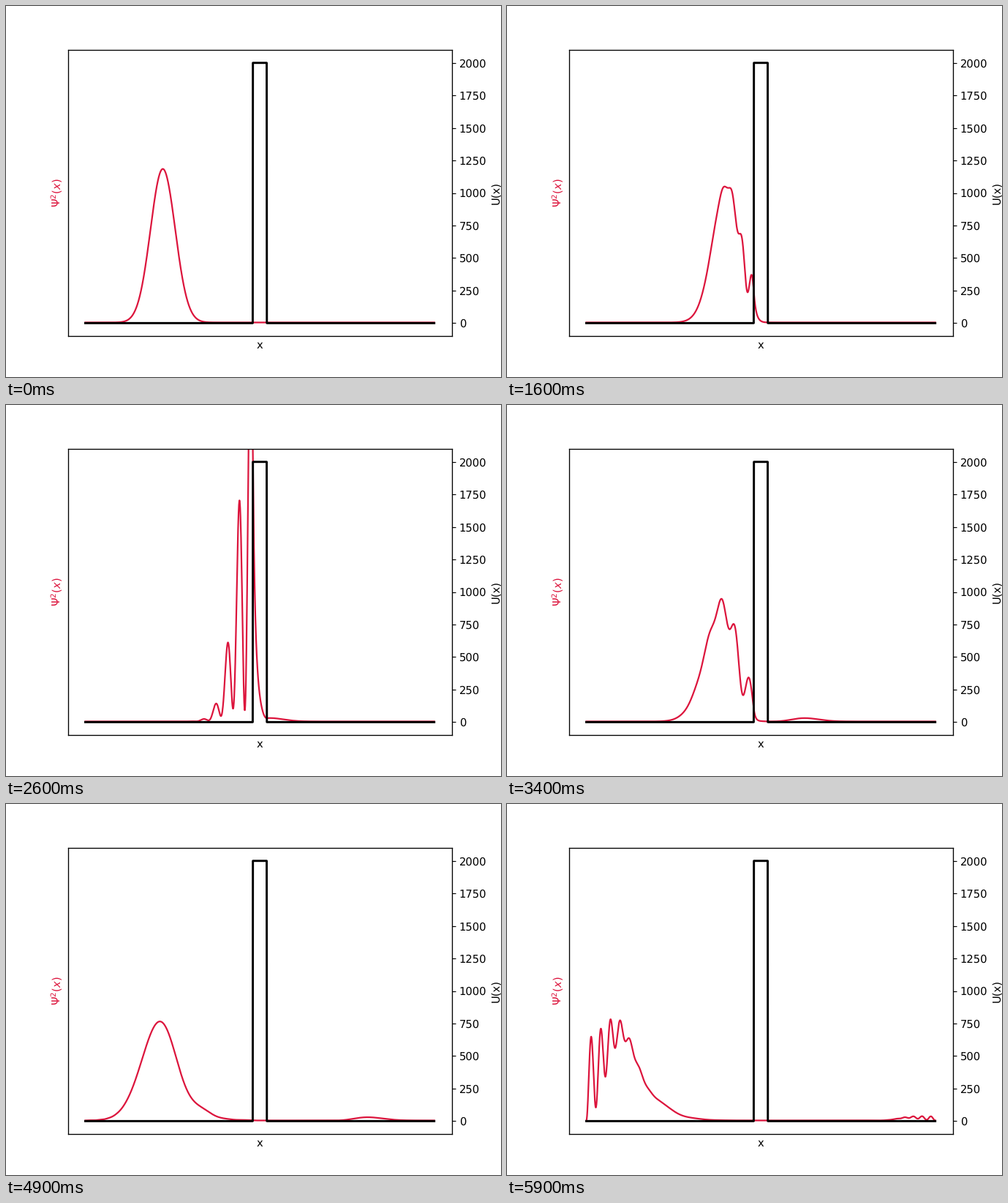
Recreate the animation shown at these times as a matplotlib script. Size 677x507 px, loop 6 s.

```python
import numpy as np
import matplotlib.pyplot as plt
from matplotlib.animation import FuncAnimation

# Wave packet hitting a square barrier between hard walls (hbar = m = 1),
# expanded in sine waves and advanced by Crank-Nicolson steps
DPI = 105.75
FRAMES, INTERVAL = 60, 100
POINTS, WAVES = 2000, 300
DT, LEAD = 5e-4, 2
X0, SIGMA, K0 = -0.6, 0.1, 50
HEIGHT, HALF_WIDTH = 2000, 0.04

x = np.linspace(-1, 1, POINTS)
dx = x[1] - x[0]
barrier = np.where(np.abs(x) <= HALF_WIDTH, HEIGHT, 0.0)


def overlap(j):
    """Integral of cos(j pi (x + 1) / 2) across the barrier."""
    return np.cos(j * np.pi / 2) * 2 * HALF_WIDTH * np.sinc(j * HALF_WIDTH / 2)


n = np.arange(1, WAVES + 1)
k = n * np.pi / 2
potential = HEIGHT / 2 * (overlap(n[:, None] - n) - overlap(n[:, None] + n))
energy, mix = np.linalg.eigh(np.diag(k**2 / 2) + potential)
modes = np.sin(np.outer(x + 1, k)) @ mix
step_phase = -2 * np.arctan(energy * DT / 2)

packet = np.exp(-(x - X0)**2 / (2 * SIGMA**2) + 1j * K0 * x)
packet /= np.sqrt(np.sum(np.abs(packet)**2) * dx)
weights = modes.T @ packet * dx


def density(step):
    psi = modes @ (weights * np.exp(1j * step_phase * step))
    return np.abs(psi)**2


plt.rcParams["font.family"] = "DejaVu Sans"
plt.rcParams["text.hinting"] = "none"
fig, ax = plt.subplots(figsize=(677 / DPI, 507 / DPI), dpi=DPI)
fig.subplots_adjust(left=0.125, right=0.9004, bottom=0.1102, top=0.8818)
wave, = ax.plot(x, density(LEAD), color="crimson", lw=1.5)
ax.set_ylim(-0.5, 10)
ax.set_xticks([])
ax.set_yticks([])
ax.set_xlabel("x")
ax.set_ylabel(r"$\Psi^2(x)$", color="crimson")

ax_u = ax.twinx()
ax_u.plot(x, barrier, color="black", lw=2)
ax_u.set_ylim(-100, 2100)
ax_u.set_yticks(np.arange(0, 2001, 250))
ax_u.set_ylabel("U(x)")


def update(i):
    wave.set_ydata(density(i + LEAD))
    return wave,


anim = FuncAnimation(fig, update, frames=FRAMES, init_func=lambda: update(0),
                     interval=INTERVAL, repeat=True, repeat_delay=0)
plt.show()
```
